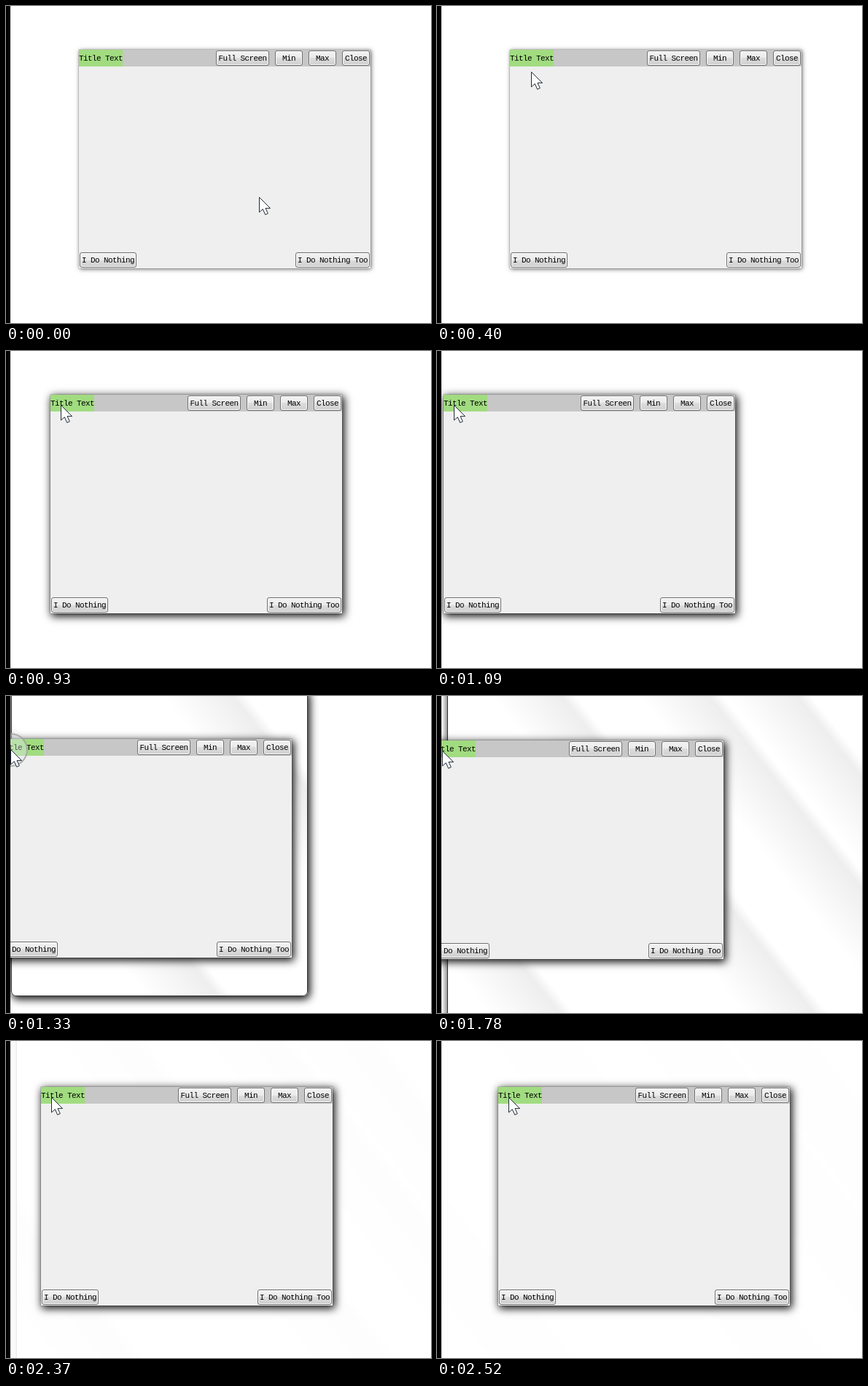
Write an HTML page that moves like this. It is 583x435 px and loops after 2590 ms.

```html
<!DOCTYPE html>
<html>
<head>
<meta charset="utf-8">
<style>
html, body { margin: 0; width: 100%; height: 100%; overflow: hidden; background: #fff; }
#stage { position: relative; width: 583px; height: 435px; overflow: hidden; background: #fff; }
#stage * { position: absolute; box-sizing: border-box; }
#strip { left: 0; top: 0; width: 6px; height: 435px; background: #000; }
#win {
  left: 0; top: 0; width: 400px; height: 300px; background: #efefef;
  font: 11px/22px "Liberation Mono", monospace; letter-spacing: -.6px; color: #000;
  box-shadow: 1px 1px 6px rgba(0,0,0,.6), 0 0 1px rgba(0,0,0,.5);
}
#win.active { box-shadow: 2px 3px 11px 1px rgba(0,0,0,.95), 0 0 1px rgba(0,0,0,.8); }
#bar { left: 0; top: 0; width: 400px; height: 23px; background: #c7c7c7; }
#title { left: 0; top: 0; width: 60px; height: 23px; line-height: 25px; background: #a1dc80; white-space: nowrap; }
.btn {
  height: 21px; line-height: 20px; text-align: center; white-space: nowrap;
  border: 1px solid #707070; border-radius: 3px; box-shadow: inset 0 0 0 1px #fafafa;
  background: linear-gradient(#f2f2f2, #ebebeb 50%, #dddddd 50%, #cfcfcf);
}
.bottom { top: 278px; }
.top { top: 1px; }
#pane {
  border: 1px solid #333; border-radius: 7px;
  box-shadow: 2px 3px 12px 1px rgba(0,0,0,.95);
}
#ripple { border: 2px solid rgba(150,150,150,.7); border-radius: 50%; background: rgba(225,230,235,.4); }
#cursor { left: 0; top: 0; overflow: visible; }
</style>
</head>
<body>
<div id="stage">
  <div id="pane"></div>
  <div id="win">
    <div id="bar"></div>
    <div id="title">Title Text</div>
    <div class="btn top" style="left:188px;width:73px">Full Screen</div>
    <div class="btn top" style="left:269px;width:38px">Min</div>
    <div class="btn top" style="left:315px;width:38px">Max</div>
    <div class="btn top" style="left:361px;width:38px">Close</div>
    <div class="btn bottom" style="left:1px;width:78px">I Do Nothing</div>
    <div class="btn bottom" style="left:297px;width:102px">I Do Nothing Too</div>
  </div>
  <div id="ripple"></div>
  <div id="strip"></div>
  <svg id="cursor" width="18" height="27">
    <path d="M.5.5V21L5.3 16.7 8.7 24.3 12.3 22.7 9 15.6H15.6Z" fill="#fff" stroke="#222a38"/>
  </svg>
</div>
<script>
const LOOP = 2590, TICK = 80;
const $ = id => document.getElementById(id);
const win = $('win'), pane = $('pane'), ripple = $('ripple'), cursor = $('cursor');

const lerp = (a, b, p) => a + (b - a) * p;
const easeOut = (p, power) => 1 - (1 - p) ** power;
const smooth = p => p * p * (3 - 2 * p);
const move = (el, x, y) => el.style.transform = `translate(${x}px,${y}px)`;

// Number of ticks begun since start, limited to 0..count
const ticks = (t, start, count, length = TICK) =>
  Math.max(0, Math.min(count, Math.floor((t - start) / length) + 1));

function box(el, left, top, right, bottom, opacity) {
  Object.assign(el.style, {
    left: left + 'px', top: top + 'px',
    width: right - left + 'px', height: bottom - top + 'px', opacity
  });
}

// Diagonal glass streaks, each fading in and ending on a sharper edge
const streaks = [220, 493, 651, 746].map(edge =>
  `#fff ${edge - 75}px, #eeeeee ${edge}px, #fff ${edge + 15}px`);
pane.style.background = `linear-gradient(51.5deg, ${streaks})`;

function windowAt(t, back) {
  if (t >= 1780) return [Math.ceil(lerp(-7, 84, back / 5)), back ? 63 : 61];
  const p = ticks(t, 930, 5) / 5;
  return [Math.round(lerp(100, -8, easeOut(p, 2))), Math.round(60 - p ** 3)];
}

function draw(t) {
  // The drag back starts with one longer tick
  const back = t < 2180 ? 0 : 1 + ticks(t, 2280, 4);
  const [x, y] = windowAt(t, back);
  move(win, x, y);
  win.className = t >= 760 ? 'active' : '';

  const approach = ticks(t, 70, 7);
  const p = smooth(approach / 6);
  if (approach < 7) move(cursor, Math.round(lerp(347, 112, p)), Math.round(lerp(262, 76, p)));
  else move(cursor, x + 14, y + 14);

  // Snap preview grows from the pointer and fades when the window leaves the edge
  const grow = ticks(t, 1250, 4, 78) / 4;
  const opacity = Math.min(1, 2 * grow) * (back > 1 ? .3 ** (back - 1) : 1);
  box(pane, 14 * grow, lerp(74, -90, grow), 828 * grow, lerp(74, 597, easeOut(grow, 1.5)), opacity);

  const radius = 46 * grow;
  box(ripple, 7 - radius, 74 - radius, 7 + radius, 74 + radius, grow && 2 - 2 * grow);
}

const start = performance.now();
function tick() {
  draw((performance.now() - start) % LOOP);
  requestAnimationFrame(tick);
}
tick();
</script>
</body>
</html>
```
